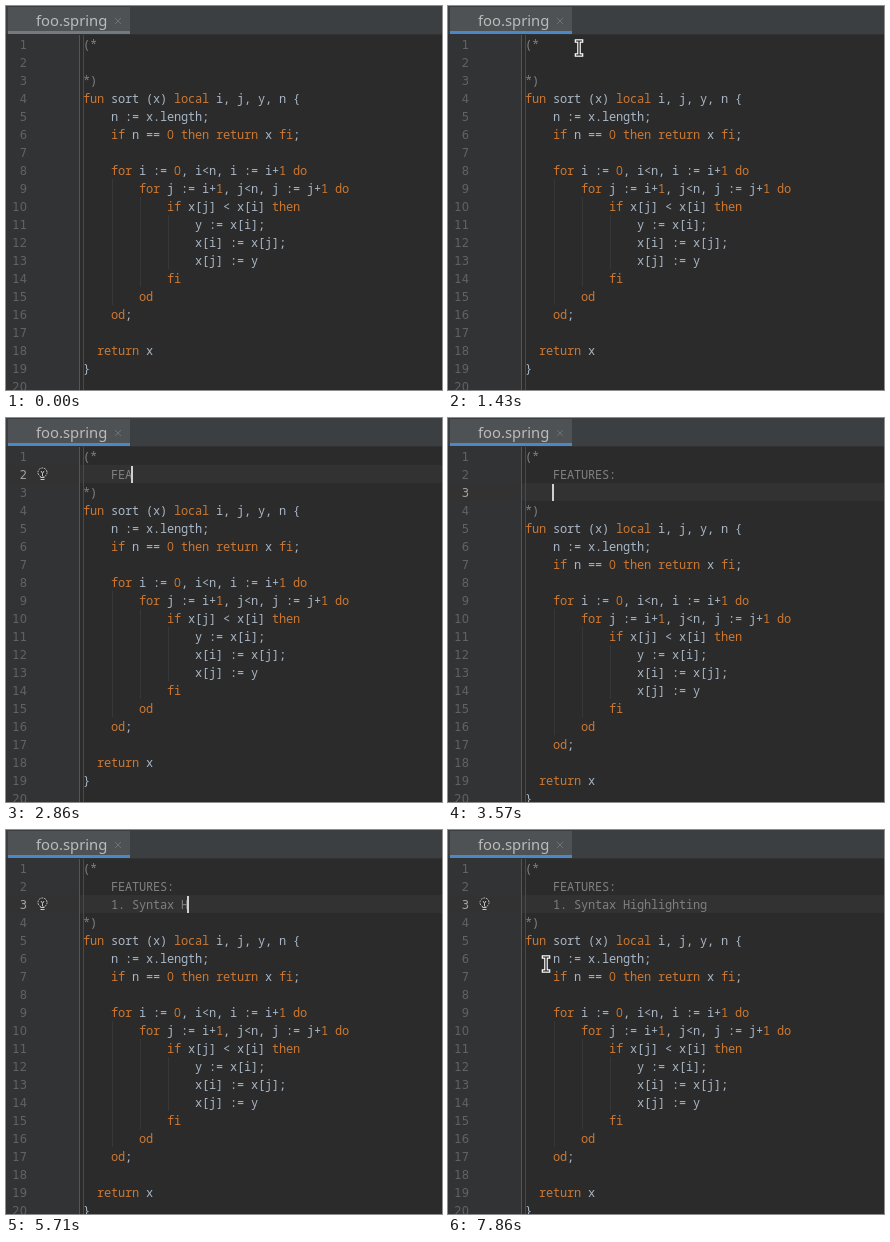
Recreate the animation shown at these times as an HTML page. Size 436x384 px, loop 8000 ms.

```html
<!DOCTYPE html>
<html lang="en">
<head>
<meta charset="utf-8">
<title>Code editor</title>
<style>
html, body { margin: 0; width: 100%; height: 100%; overflow: hidden; background: #2b2b2b; }
svg { display: block; width: 436px; height: 384px; }
text { white-space: pre; }
.code { font: 12px "Noto Sans Mono", "DejaVu Sans Mono", monospace; letter-spacing: -.2px; fill: #a9b7c6; }
.kw { fill: #cc7832; }
.zero { font-family: "Open Sans", sans-serif; letter-spacing: 0; }
.note { fill: #808080; }
.num { font: 11.5px "DejaVu Sans", sans-serif; fill: #606366; text-anchor: end; }
.num.on { fill: #a4a3a3; }
.tab { font: 300 14.8px "Noto Sans", sans-serif; fill: #bbb; }
</style>
</head>
<body>
<svg id="stage" viewBox="0 0 436 384">
  <rect width="436" height="384" fill="#2b2b2b"/>
  <rect y="29" width="73" height="355" fill="#313335"/>
  <rect id="band" width="436" height="18" fill="#323232"/>
  <rect x="73" y="29" width="1" height="355" fill="#555"/>
  <rect x="77" y="29" width="1" height="355" fill="#4a4a4a"/>
  <rect width="436" height="29" fill="#3c3f41"/>
  <rect y="28" width="436" height="1" fill="#323232"/>
  <rect x="2" y="1" width="122" height="27" fill="#4e5254"/>
  <rect id="line" x="2" y="25" width="122" height="3"/>
  <text class="tab" x="30" y="20">foo.spring</text>
  <path d="M109 12l6 6m0-6l-6 6" stroke="#6e7173" fill="none"/>
  <g id="nums"></g>
  <g id="head"></g>
  <g id="body"></g>
  <g id="bulb" fill="none" stroke="#c8c8c8">
    <circle cx="36.500" cy="54.500" r="4.500" fill="#2b2b2b" stroke-dasharray="1.800 1"/>
    <path d="M35 53l1.500 2.500L38 53M36.500 55.500V58M34.500 59.500h4M34.500 61.500h4"/>
  </g>
  <rect id="caret" width="2" height="17" fill="#d0d0d0"/>
  <g id="mouse" fill="none" stroke-linecap="square">
    <path d="M-2.500-7h5M0-7V7M-2.500 7h5" stroke="#fff" stroke-width="3.600"/>
    <path d="M-2.500-7h5M0-7V7M-2.500 7h5" stroke="#111" stroke-width="1.200"/>
  </g>
</svg>
<script>
const LOOP = 8000, STEP = 1000 / 7, LEFT = 77, CHAR = 7, ROW = 18;
const el = id => document.getElementById(id);
const baseline = row => 43 + ROW * (row - 1);
const rowTop = row => 29 + ROW * (row - 1);

const program = `fun sort (x) local i, j, y, n {
    n := x.length;
    if n == 0 then return x fi;

    for i := 0, i<n, i := i+1 do
        for j := i+1, j<n, j := j+1 do
            if x[j] < x[i] then
                y := x[i];
                x[i] := x[j];
                x[j] := y
            fi
        od
    od;

  return x
}`.split("\n");

function add(parent, tag, attrs, text = "") {
  const node = document.createElementNS("http://www.w3.org/2000/svg", tag);
  for (const key in attrs) node.setAttribute(key, attrs[key]);
  node.textContent = text;
  parent.append(node);
  return node;
}

function addCode(parent, src, row) {
  const keyword = /^(fun|local|if|then|return|fi|for|do|od|\d)$/;
  for (const m of src.matchAll(/\w+|[^\w\s]+/g)) {
    const cls = "code" + (keyword.test(m[0]) ? " kw" : "") + (m[0] === "0" ? " zero" : "");
    add(parent, "text", { class: cls, x: LEFT + CHAR * m.index, y: baseline(row) }, m[0]);
  }
}

// Indent guides: column, first row, last row
for (const [col, from, to] of [[4, 9, 15], [8, 10, 14], [12, 11, 13]])
  add(el("body"), "rect", {
    x: LEFT + CHAR * col + 1, y: rowTop(from),
    width: 1, height: ROW * (to - from + 1), fill: "#373737"
  });
program.forEach((src, i) => addCode(el("body"), src, i + 4));

const note = (col, row, text) =>
  add(el("head"), "text", { class: "code note", x: LEFT + CHAR * col, y: baseline(row) }, text);
note(0, 1, "(*");
const title = note(4, 2, ""), item = note(4, 3, ""), close = note(0, 3, "*)");

const nums = Array.from({ length: 20 }, (_, i) =>
  add(el("nums"), "text", { class: "num", x: 21, y: baseline(i + 1) }, i + 1));

// Each key is struck at the tick of the same index
const CLICK = 15, ENTER = 25;
const titleKeys = [18, 19, 20, 21, 21, 22, 22, 23, 24];
const itemKeys = [29, 30, 32, 34, 35, 36, 37, 38, 38, 39, 40, 41, 42, 43, 43, 44, 45, 45, 46, 47, 48, 49];
const events = [CLICK, ...titleKeys, ENTER, ...itemKeys];
const typed = (text, keys, tick) => text.slice(0, keys.filter(k => k <= tick).length);

// Pointer path: tick, x, y
const entry = [[7, 372, 34], [8, 276, 37], [9, 180, 39], [10, 131, 42], [12, 128, 52], [16, 124, 57]];
const exit = [[52, 124, 76], [53, 114, 96], [54, 102, 122], [55, 98, 134], [56, 98, 134]];

function along(path, tick) {
  const i = path.findIndex(p => p[0] > tick);
  if (i < 1) return null;
  const a = path[i - 1], b = path[i], k = (tick - a[0]) / (b[0] - a[0]);
  return [a[1] + (b[1] - a[1]) * k, a[2] + (b[2] - a[2]) * k];
}

const show = (node, on) => node.setAttribute("visibility", on ? "visible" : "hidden");
const move = (node, x, y) => node.setAttribute("transform", `translate(${x} ${y})`);

function draw(time) {
  const tick = Math.floor((time + 6) / STEP);
  const split = tick >= ENTER, active = tick >= CLICK, row = split ? 3 : 2;

  title.textContent = typed("FEATURES:", titleKeys, tick);
  item.textContent = typed("1. Syntax Highlighting", itemKeys, tick);
  close.setAttribute("y", baseline(split ? 4 : 3));
  move(el("body"), 0, split ? ROW : 0);
  el("line").setAttribute("fill", tick >= 7 ? "#4a88c7" : "#747a80");

  nums.forEach((n, i) => n.setAttribute("class", active && i + 1 === row ? "num on" : "num"));
  show(el("band"), active);
  move(el("band"), 0, rowTop(row));

  const last = events.filter(e => e <= tick).pop();
  const blinkOn = (time + 6 - last * STEP) % 1000 < 500;
  const count = (split ? item : title).textContent.length;
  show(el("caret"), active && blinkOn);
  move(el("caret"), LEFT + CHAR * (4 + count) - 1, rowTop(row) + 1);

  show(el("bulb"), tick >= 16 && tick < ENTER || tick >= 27);
  move(el("bulb"), 0, ROW * (row - 2));

  const at = along(entry, tick) || along(exit, tick);
  show(el("mouse"), at);
  if (at) move(el("mouse"), ...at);
}

const start = performance.now();
function loop() {
  draw((performance.now() - start) % LOOP);
  requestAnimationFrame(loop);
}
draw(0);
requestAnimationFrame(loop);
</script>
</body>
</html>
```
